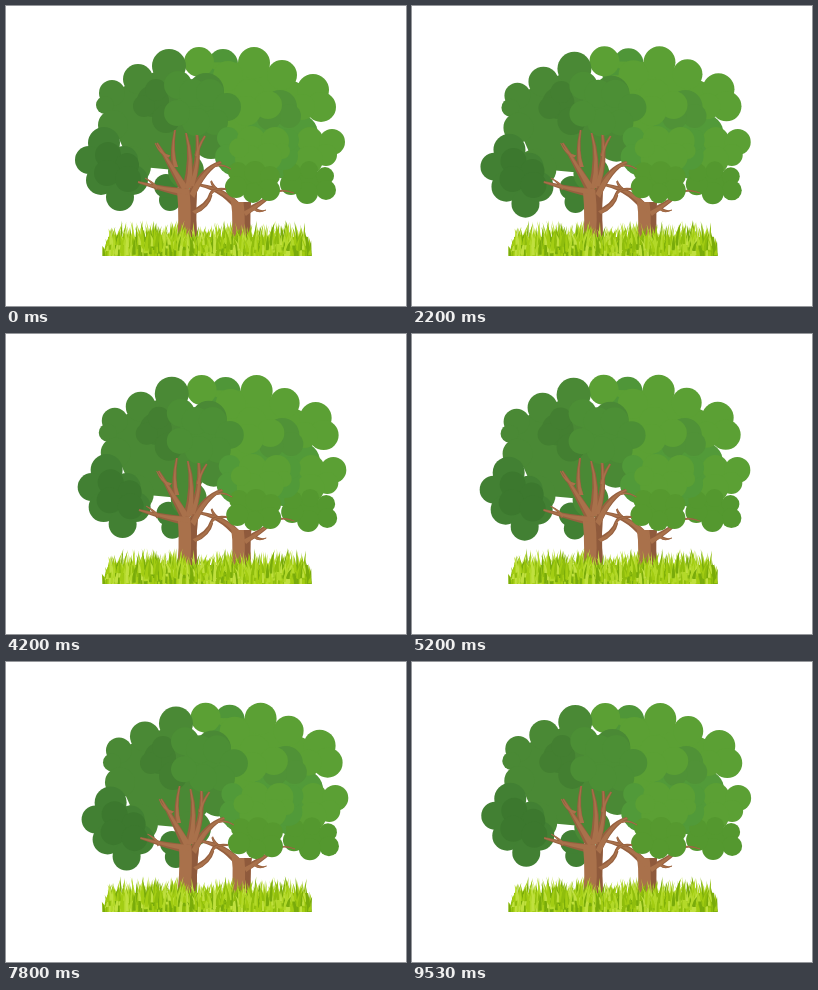
These frames come from a looping animation (400x300 px, 9610 ms). An HTML page with a canvas:

```html
<!DOCTYPE html>
<html lang="en">
<head>
<meta charset="utf-8">
<title>Swaying trees</title>
<style>
  html, body { margin: 0; height: 100%; overflow: hidden; background: #fff; }
  canvas { display: block; width: 400px; height: 300px; }
</style>
</head>
<body>
<canvas width="400" height="300"></canvas>
<script>
const ctx = document.querySelector('canvas').getContext('2d');
const LOOP = 9610, TURN = Math.PI * 2;

let seed = 11;
const random = () => (seed = seed * 16807 % 2147483647) / 2147483647;

// Leaf clumps: colour, sway and dip weights, then x, y, r of each lobe.
const backLeaves = [
  ['#418033', .8, .3, [164, 194, 11, 160, 180, 12]],
  ['#4f9638', .9, -.1, [217, 58, 15, 232, 72, 14, 205, 70, 14]],
  ['#529a39', .7, 0, [230, 110, 22, 280, 100, 24, 292, 128, 20, 280, 155, 18, 230, 150, 20]],
  ['#5ba034', .9, -.1, [193, 56, 15, 248, 57, 16, 276, 69, 15, 307, 84, 16, 315, 101, 15, 296, 101, 13, 260, 101, 15, 225, 115, 18, 205, 85, 15, 222, 70, 15]],
  ['#509237', .8, 0, [274, 101, 17, 283, 110, 12, 263, 112, 12]],
  ['#5ba034', .8, 0, [243, 88, 15, 262, 99, 14, 240, 105, 15]],
  ['#5ba034', .45, 0, [304, 134, 13, 326, 136, 13, 320, 149, 11, 303, 154, 14]],
  ['#54982f', .4, .05, [303, 164, 9, 319, 170, 9, 320, 184, 10, 301, 187, 11, 285, 178, 11, 286, 166, 9]]
];
const leftLeaves = [
  ['#4a8935', .95, .4, [163, 60, 17, 132, 73, 15, 106, 87, 13, 99, 99, 9, 107, 119, 15, 125, 160, 20, 180, 165, 18, 205, 135, 18, 200, 85, 18]],
  ['#437f31', .95, .3, [147, 95, 16, 138, 100, 11, 160, 113, 14, 150, 84, 11]],
  ['#428033', .9, 1, [98, 137, 16, 83, 154, 14, 95, 174, 15, 114, 191, 14, 127, 174, 15, 118, 154, 14]],
  ['#3c782e', .9, .9, [102, 149, 13, 121, 159, 12, 101, 167, 13, 122, 173, 13]],
  ['#4c8f35', .95, .1, [172, 79, 14, 187, 87, 14, 204, 87, 14, 221, 101, 14, 209, 116, 13, 190, 116, 14, 171, 107, 13]]
];
const frontLeaves = [
  ['#519a39', .6, 0, [222, 132, 11, 222, 151, 13, 278, 150, 14, 282, 134, 11]],
  ['#5ba034', .6, 0, [245, 134, 14, 269, 135, 14, 276, 145, 8, 262, 151, 14, 243, 153, 14, 233, 142, 10]],
  ['#56992f', .4, .05, [232, 166, 10, 249, 166, 11, 264, 170, 10, 263, 184, 11, 247, 187, 10, 230, 181, 11]]
];

// Branches: start, bend, end, start width, end width.
const leftTree = [
  [182, 187, 163, 185, 132, 176, 10, 2], [151, 183, 148, 177, 139, 172, 4, 1],
  [178, 183, 164, 158, 151, 137, 9, 2], [169, 161, 165, 146, 169, 124, 6, 2],
  [163, 151, 154, 148, 149, 137, 4, 1], [181, 182, 187, 152, 180, 127, 9, 2],
  [184, 180, 194, 158, 191, 129, 8, 3], [190, 150, 192, 141, 199, 130, 4, 2],
  [185, 189, 198, 162, 215, 156, 9, 3], [204, 162, 214, 156, 225, 163, 3, 1],
  [187, 206, 202, 200, 205, 188, 6, 4], [204, 190, 205, 182, 220, 183, 4, 2]
];
const rightTree = [
  [235, 205, 220, 184, 194, 179, 9, 3], [215, 187, 207, 182, 205, 175, 4, 2],
  [238, 207, 254, 198, 264, 190, 7, 3], [248, 202, 253, 207, 260, 204, 4, 1],
  [262, 190, 273, 181, 288, 187, 3, 1], [266, 160, 273, 159, 280, 163, 3, 1]
];

const blades = Array.from({ length: 620 }, (_, i) => {
  const x = 98 + random() * 206;
  const edge = Math.min(1, .35 + Math.min(x - 97, 305 - x) / 12);
  const base = i < 380 ? 250 : 238 + random() * 12;
  const height = (i < 380 ? 17 + 19 * random() ** 1.3 : 9 + random() * 13) * edge;
  const color = ['#79ab0b', '#8fbd0d', '#a3cd13', '#b3d929', '#c0e03f'][random() * 5 | 0];
  return { x, base, height, color, lean: (random() - .5) * 11 * edge, width: 1 + random() * .7 };
});

const sway = p => -6 * Math.sin(TURN * p) + 1.6 * Math.sin(2 * TURN * p) + .9 * (1 - Math.cos(TURN * p));
const dip = p => 4 * (Math.cos(TURN * (p - .39)) + .77);

function fillPath(color, trace) {
  ctx.beginPath();
  trace();
  ctx.fillStyle = color;
  ctx.fill();
}

function clump([color, swayWeight, dipWeight, lobes], p) {
  ctx.save();
  ctx.translate(sway(p) * swayWeight, dip(p) * dipWeight);
  fillPath(color, () => {
    for (let i = 0; i < lobes.length; i += 3) ctx.lineTo(lobes[i], lobes[i + 1]);
  });
  for (let i = 0; i < lobes.length; i += 3) {
    fillPath(color, () => ctx.arc(lobes[i], lobes[i + 1], lobes[i + 2], 0, TURN));
  }
  ctx.restore();
}

function limb([x0, y0, cx, cy, x1, y1, w0, w1], color, shrink = 1) {
  const length = Math.hypot(x1 - x0, y1 - y0);
  const nx = (y0 - y1) / length / 2, ny = (x1 - x0) / length / 2;
  const a = w0 * shrink, b = w1 * shrink, m = (a + b) / 2;
  fillPath(color, () => {
    ctx.moveTo(x0 + nx * w0, y0 + ny * w0);
    ctx.quadraticCurveTo(cx + nx * m, cy + ny * m, x1 + nx * b, y1 + ny * b);
    ctx.lineTo(x1 - nx * b, y1 - ny * b);
    ctx.quadraticCurveTo(cx - nx * m, cy - ny * m, x0 - nx * a, y0 - ny * a);
  });
}

function trunk(x, top, width) {
  const shape = (left, right, color) => fillPath(color, () => {
    ctx.moveTo(x + left - 1, 240);
    ctx.quadraticCurveTo(x + left + 3, 215, x + left, top);
    ctx.lineTo(x + right, top);
    ctx.quadraticCurveTo(x + right - 2, 215, x + right + 1, 240);
  });
  shape(-width / 2, width / 2, '#a9714b');
  shape(width / 8, width / 2, '#8f5a3c');
}

function tree(limbs, x, top, width, bend) {
  ctx.save();
  ctx.transform(1, 0, -bend, 1, bend * 230, 0);
  limbs.forEach(l => limb(l, '#96603f'));
  trunk(x, top, width);
  limbs.forEach(l => limb(l, '#a9714b', .4));
  ctx.restore();
}

function grass(p) {
  fillPath('#8dbb0d', () => ctx.rect(102, 231, 200, 19));
  for (const { x, base, height, color, lean, width } of blades) {
    const tip = x + lean + Math.sin(TURN * 2 * p + x * .08) * height * .045;
    fillPath(color, () => {
      ctx.moveTo(x - width, base);
      ctx.quadraticCurveTo(x - width, base - height * .6, tip, base - height);
      ctx.quadraticCurveTo(x + width, base - height * .55, x + width, base);
    });
  }
}

function draw(now) {
  const p = now % LOOP / (LOOP / 2);
  const bend = sway(p) * .006;
  const leaves = list => list.forEach(c => clump(c, p));
  ctx.clearRect(0, 0, 400, 300);
  leaves(backLeaves);
  leaves(leftLeaves);
  tree(rightTree, 235, 196, 20, bend * .5);
  leaves(frontLeaves);
  tree(leftTree, 181, 184, 20, bend);
  grass(p);
  requestAnimationFrame(draw);
}
requestAnimationFrame(draw);
</script>
</body>
</html>
```
